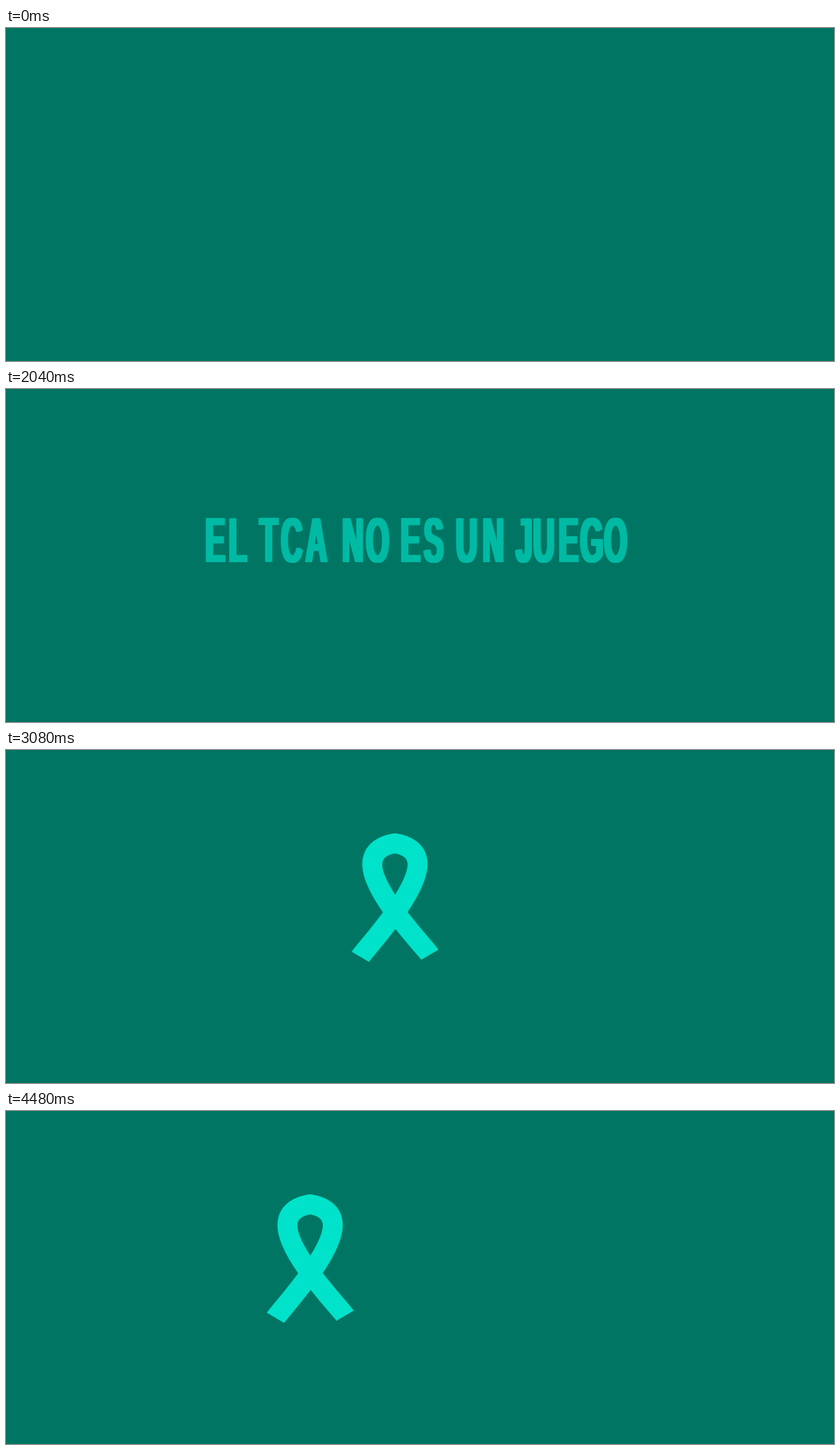
Recreate the animation shown at these times as an HTML page. Size 1179x475 px, loop 4640 ms.

```html
<!DOCTYPE html>
<html lang="es">
<head>
<meta charset="utf-8">
<title>El TCA no es un juego</title>
<style>
  :root { --paper: #007563; --ink: #00e2ca; }
  html, body {
    margin: 0;
    width: 100%;
    height: 100%;
    overflow: hidden;
    background: var(--paper);
  }
  #stage {
    position: relative;
    width: 1179px;
    height: 475px;
    overflow: hidden;
    color: var(--ink);
    font: bold 90px/1 "Liberation Sans", Arial, sans-serif;
  }
  svg { position: absolute; inset: 0; }
  #ribbon {
    fill: none;
    stroke: var(--ink);
    stroke-width: 28.4;
    stroke-miterlimit: 10;
  }
  /* One condensed face for all lettering, with heavier stems */
  .letter {
    position: absolute;
    top: calc(var(--baseline) - .8465em);
    transform: translateX(-50%) scaleX(.47);
    text-shadow: .05em 0, -.05em 0;
    opacity: 0;
  }
  #slogan { --baseline: 247px; }
  #acronym { --baseline: 295px; font-size: 232.5px; }
</style>
</head>
<body>
<div id="stage">
  <div id="slogan"></div>
  <svg width="1179" height="475">
    <path id="ribbon" pathLength="1" d="M-49.3 295 C-44 286 32.3 205 32.3 163
      C32.3 143 16 135.5 0 133 C-16 135.5 -32.3 143 -32.3 163
      C-32.3 205 44.5 283 49.8 292"/>
    <rect id="hyphen" x="511.5" y="204" width="45.5" height="22.3" fill="var(--ink)"/>
  </svg>
  <div id="acronym"></div>
</div>
<script>
  const LOOP = 4640, FRAME = 40;
  const byId = id => document.getElementById(id);
  const [slogan, acronym, ribbon, hyphen] =
    ["slogan", "acronym", "ribbon", "hyphen"].map(byId);

  // Places each letter on its centre; spaces only take up time.
  function setLetters(parent, text, centres) {
    let next = 0;
    return [...text].map(char => {
      if (char === " ") return null;
      const letter = document.createElement("span");
      letter.className = "letter";
      letter.textContent = char;
      letter.style.left = centres[next++] + "px";
      parent.append(letter);
      return letter;
    });
  }

  const sloganLetters = setLetters(slogan, "EL TCA NO ES UN JUEGO", [
    298, 330, 374, 406.5, 442, 493.5, 528.5, 575.5,
    609, 656, 693.5, 737.5, 766, 801, 834, 868
  ]);
  const acronymLetters = [hyphen, ...setLetters(acronym, "TCA", [597, 681, 772.5])];

  const progress = (t, start, end) => Math.min(1, Math.max(0, (t - start) / (end - start)));

  // Fades the characters in, one after the other.
  function typeIn(letters, t, start, end) {
    const reached = progress(t, start, end) * letters.length;
    letters.forEach((letter, i) => {
      if (letter) letter.style.opacity = progress(reached, i, i + 1);
    });
  }

  function render(t) {
    typeIn(sloganLetters, t, 0, 1000);
    slogan.style.opacity = 1 - progress(t, 2000, 2110);

    const drawn = progress(t, 2167, 3000);
    ribbon.style.visibility = drawn > 0 ? "visible" : "hidden";
    ribbon.style.strokeDasharray = drawn < 1 ? `${drawn} 2` : "none";
    const x = 588.5 - 155.5 * progress(t, 3000, 3358);
    ribbon.setAttribute("transform", `translate(${x} 0)`);

    typeIn(acronymLetters, t < 4480 ? t : 0, 3342, 3758);
  }

  function tick() {
    const t = performance.now() % LOOP;
    render(Math.floor(t / FRAME) * FRAME);
    requestAnimationFrame(tick);
  }
  tick();
</script>
</body>
</html>
```
